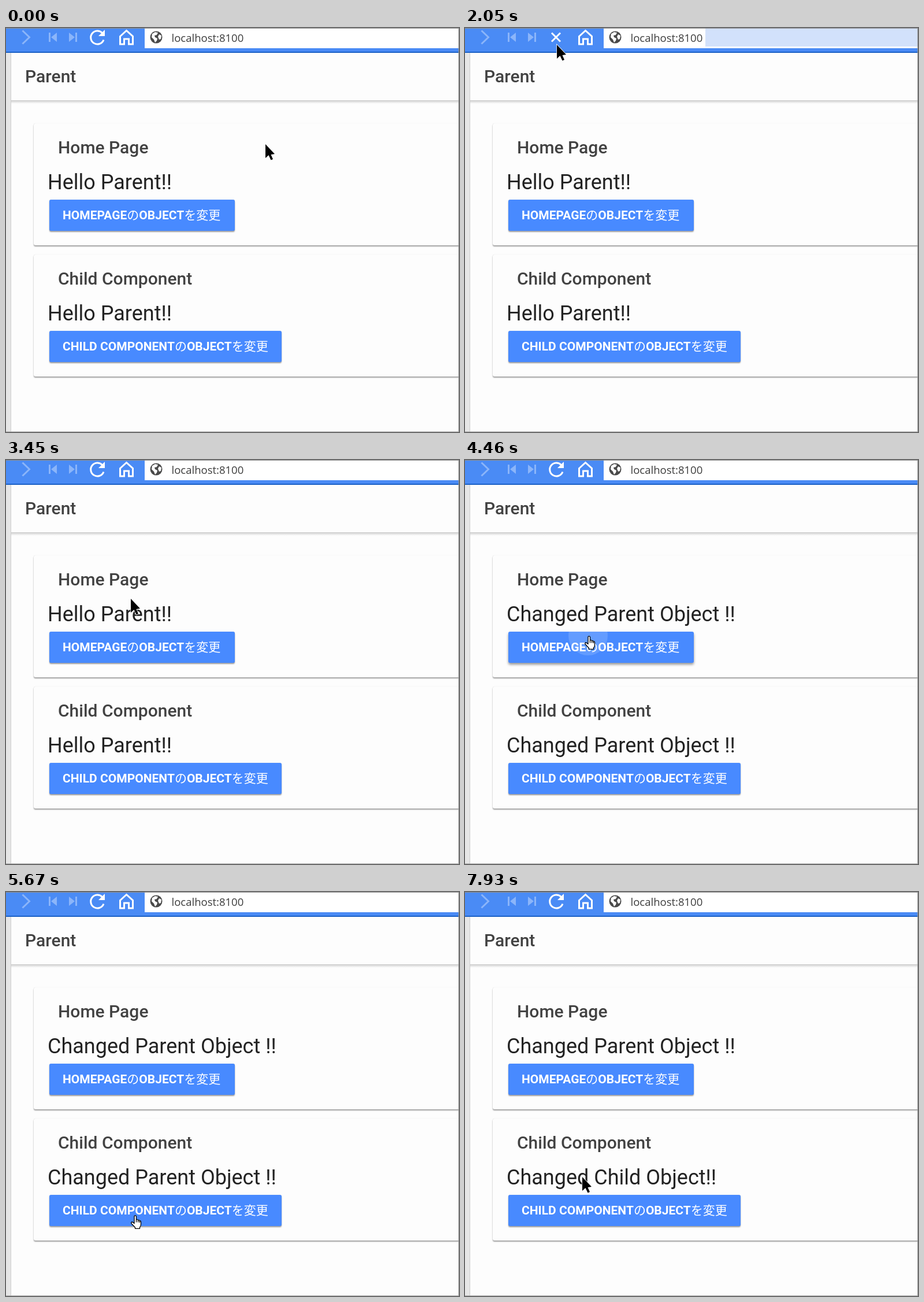
Write an HTML page that moves like this. It is 784 px wide and 699 px high and loops after 8000 ms.

```html
<!DOCTYPE html>
<html lang="ja">
<head>
<meta charset="utf-8">
<title>Parent</title>
<style>
html, body { margin: 0; width: 100%; height: 100%; overflow: hidden; background: #fdfdfd; }
div, svg { position: absolute; box-sizing: border-box; }
svg { left: 0; top: 0; }
#stage { inset: 0; overflow: clip; }
#bar { left: 0; right: 0; top: 0; height: 43px; background: #4a8bf5; border-bottom: 2px solid #1a60c6; }
#hover { left: 132px; top: 1px; width: 51px; height: 40px; background: #327ade; }
#url { left: 240px; right: 1px; top: 1px; height: 34px; background: #fff; }
#load { right: 1px; top: 1px; height: 31px; background: #d2e1fb; }
#gutter { left: 0; top: 43px; bottom: 1px; width: 9px; background: #e6e6e6; border-right: 1px solid #cfcfcf; }
#head { left: 9px; right: 1px; top: 125px; height: 6px; background: linear-gradient(#c9c9c9, #dedede 35%, #fdfdfd); }
.card, .btn { border-radius: 3px; box-shadow: 0 2px 2px rgba(0,0,0,.36), 0 0 1px rgba(0,0,0,.2); }
.card { left: 48px; right: 0; height: 211px; border-radius: 3px 0 0 3px; background: #fdfdfd; }
.btn { left: 75px; height: 54px; background: #488aff; overflow: hidden; }
.btn.down { box-shadow: 0 3px 4px rgba(0,0,0,.4); }
.ripple { border-radius: 50%; background: #fff; }
#frame { inset: 0; border: solid #8c8c8c; border-width: 1px 1px 1px 0; border-bottom-color: #a8a8a8; }
text { font-family: Roboto, "Noto Sans CJK JP", "Noto Sans CJK", sans-serif; }
.title { font-size: 30px; font-weight: 500; fill: #424242; }
.hello { font-size: 36px; fill: #222; }
.label { font-size: 21px; font-weight: 600; fill: #fff; }
.label tspan { font-weight: 400; }
.addr { font: 18.5px "Open Sans", "Noto Sans", sans-serif; fill: #3c3c3c; }
</style>
</head>
<body>
<div id="stage">
  <div id="bar"></div>
  <div id="hover"></div>
  <div id="url"></div>
  <div id="load"></div>
  <div id="gutter"></div>
  <div id="head"></div>
  <div class="card" style="top:165px"></div>
  <div class="card" style="top:392px"></div>
  <div class="btn" style="top:297px;width:321px"><div class="ripple"></div></div>
  <div class="btn" style="top:524px;width:402px"><div class="ripple"></div></div>

  <svg width="784" height="699">
    <g fill="#8bb5fa" stroke="#8bb5fa">
      <path d="M28.5 4.5L40.5 16L28.5 27.5M75.5 8V24M121.5 8V24" fill="none" stroke-width="3"/>
      <path d="M88 8V24L78 16ZM109 8V24L119 16Z" stroke="none"/>
    </g>
    <g fill="none" stroke="#fff" stroke-width="3">
      <g id="reload">
        <path d="M169 20.5A11.5 11.5 0 1 1 166.5 8.5"/>
        <path d="M171 3V14H160Z" fill="#fff" stroke="none"/>
      </g>
      <path id="stop" d="M150 8.5L165 23.5M165 8.5L150 23.5"/>
      <path d="M197.5 14.5L208.5 4.5L219.5 14.5V28H212.5V19H204.5V28H197.5Z"/>
    </g>
    <circle cx="260" cy="16" r="10.5" fill="#4a4a4a"/>
    <path d="M253 10L258 7L263 8L261 12L257 13L258 16L262 18L261 22L258 25L256 20L252 16ZM265 11L269 13L268 19L265 20L263 15Z" fill="#fff"/>
    <text class="addr" x="286.5" y="23.5">localhost:8100</text>

    <text class="title" x="33" y="94">Parent</text>
    <text class="title" x="90" y="217">Home Page</text>
    <text class="title" x="90" y="444">Child Component</text>
    <text class="hello" x="72" y="279"></text>
    <text class="hello" x="72" y="506"></text>
    <text class="label" x="98" y="331">HOMEPAGE<tspan>の</tspan>OBJECT<tspan>を変更</tspan></text>
    <text class="label" x="98" y="558">CHILD COMPONENT<tspan>の</tspan>OBJECT<tspan>を変更</tspan></text>

    <g id="cursor">
      <path id="arrow" d="M0 0V24L5.5 19L9.5 27.5L13 26L9.5 18L16 17Z" stroke="#fff" stroke-width="1.5" paint-order="stroke"/>
      <g id="hand" transform="translate(-8)" fill="#fff" stroke="#000" stroke-width="1.3" stroke-linejoin="round">
        <path d="M6 14V2.5Q6 .8 7.7 .8T9.5 2.5V8Q12 7 12.6 9Q15 8 15.4 10Q17.5 9.5 17.5 12V16Q17.5 19 15.5 21V23.3H7.5V21.5L1 14.5Q0 12.5 2 12Q4 12 6 14.5Z"/>
        <path d="M9.5 8V12.5M12.6 9V12.5M15.4 10V13" fill="none"/>
      </g>
    </g>
  </svg>
  <div id="frame"></div>
</div>

<script>
const LOOP = 8000, TICK = 130;
const RELOAD = 1370, LOAD = 1650, LOADED = 2320, PRESS = [4460, 6380];
const $ = id => document.getElementById(id);
const all = sel => [...document.querySelectorAll(sel)];
const hellos = all(".hello"), buttons = all(".btn"), ripples = all(".ripple");

const easeOut = u => 1 - (1 - u) ** 1.5;
const smooth = u => u * u * (3 - 2 * u);
const ticks = ms => Math.floor(ms / TICK + .1);
const within = (t, a, b) => t >= a && t < b;
const show = (el, on) => el.style.display = on ? "" : "none";

// The pointer follows one curve per move, in visible steps.
const home = [449, 201], refresh = [159, 29], first = [215, 304], second = [224, 559];
const moves = [
  { at: 710, steps: 6, ease: easeOut, from: home, via: [188, 184], to: refresh },
  { at: 3030, steps: 7, ease: easeOut, from: refresh, via: [228, 200], to: first },
  { at: 4980, steps: 6, ease: smooth, from: first, via: [228, 521], to: second },
  { at: 7930, steps: 1, ease: smooth, from: second, via: second, to: [203, 493] }
];

function pointer(t) {
  const m = moves.findLast(m => m.at <= t);
  if (!m) return home;
  const v = m.ease(Math.min(1, (ticks(t - m.at) + 1) / m.steps));
  return m.from.map((a, i) =>
    Math.round((1 - v) ** 2 * a + 2 * v * (1 - v) * m.via[i] + v * v * m.to[i]));
}

const overButton = ([x, y]) => buttons.some(b =>
  within(x, b.offsetLeft, b.offsetLeft + b.offsetWidth) &&
  within(y, b.offsetTop, b.offsetTop + b.offsetHeight));

function drawRipple(i, t) {
  const step = ticks(t - PRESS[i]), r = 34 + 222 * step;
  const [x, y] = [first, second][i], b = buttons[i];
  show(ripples[i], within(step, 0, 2));
  Object.assign(ripples[i].style, {
    left: x - 2 - r - b.offsetLeft + "px", top: y - r - b.offsetTop + "px",
    width: 2 * r + "px", height: 2 * r + "px", opacity: .15 - .07 * step
  });
}

function draw(t) {
  const p = pointer(t), hand = overButton(p);
  $("cursor").setAttribute("transform", `translate(${p})`);
  show($("arrow"), !hand);
  show($("hand"), hand);

  const busy = within(t, LOAD, LOADED);
  show($("hover"), within(t, RELOAD, LOAD));
  show($("stop"), busy);
  show($("reload"), !busy);
  show($("load"), busy);
  $("load").style.left = (t < 2050 ? 243 : t < 2170 ? 416 : 651) + "px";

  const parent = t < PRESS[0] ? "Hello Parent!!" : "Changed Parent Object !!";
  hellos[0].textContent = parent;
  hellos[1].textContent = t < PRESS[1] ? parent : "Changed Child Object!!";
  PRESS.forEach((_, i) => drawRipple(i, t));
  buttons[0].classList.toggle("down", within(ticks(t - PRESS[0]), 0, 2));
}

const start = performance.now();
function tick() {
  draw((performance.now() - start) % LOOP);
  requestAnimationFrame(tick);
}
tick();
</script>
</body>
</html>
```
